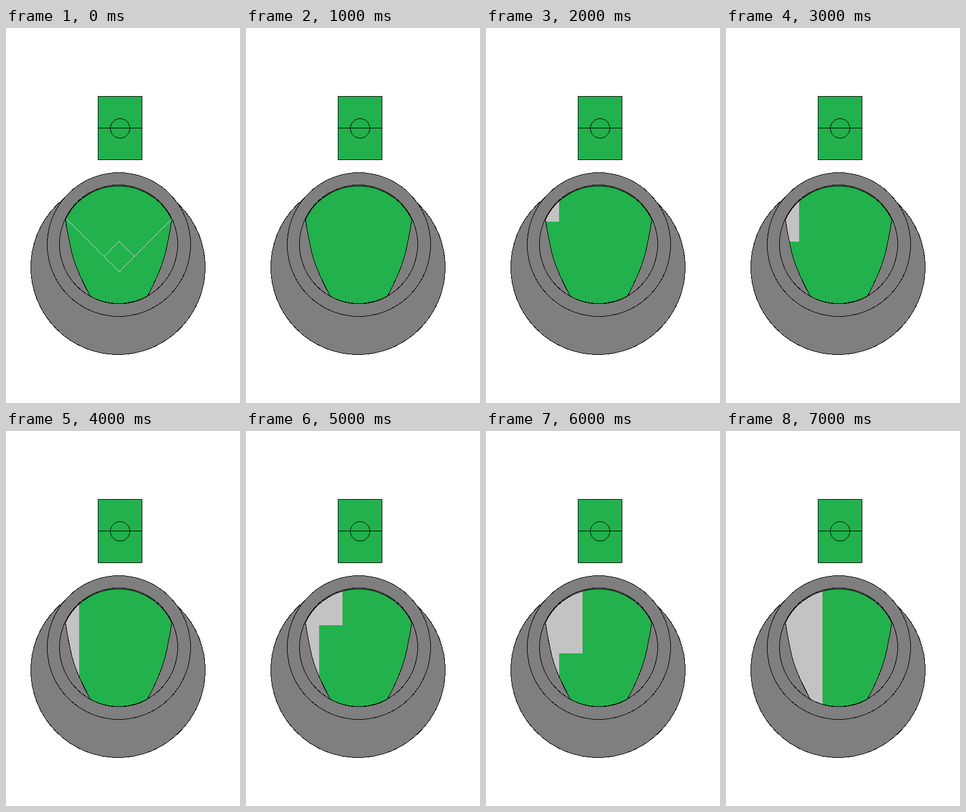
These frames come from a looping animation (400 by 639 pixels, 8000 ms). An HTML page:

```html
<!DOCTYPE html>
<html lang="en">
<head>
<meta charset="utf-8">
<title>Ballpark seating</title>
<style>
  html, body { margin: 0; width: 100%; height: 100%; overflow: hidden; background: #fff; }
  svg { display: block; width: 100vw; height: 100vh; }
  .line { fill: none; stroke: #000; }
  .chalk { fill: none; stroke: #dcd8d8; }
  .grass { fill: #22b14c; }
  .stand { fill: #7f7f7f; stroke: #000; }
</style>
</head>
<body>
<svg viewBox="0 0 400 639" shape-rendering="crispEdges">
  <defs>
    <path id="field" d="M101.5 326.5 A101 101 0 0 1 283.5 326.5
      C274 384 270 404 241.5 457.5 A101 101 0 0 1 144.5 457.5 C115 404 111 384 101.5 326.5Z"/>
    <clipPath id="inside"><use href="#field"/></clipPath>
  </defs>

  <rect class="grass" x="157.5" y="116.5" width="75" height="108" stroke="#000"/>
  <path class="line" d="M157 170.5H233"/>
  <circle class="line" cx="195" cy="171" r="16.5"/>

  <circle class="stand" cx="191.5" cy="407.5" r="149"/>
  <circle class="stand" cx="193" cy="369" r="122.5"/>
  <use class="grass" href="#field"/>
  <g id="seats" clip-path="url(#inside)" fill="#c3c3c3"></g>
  <use class="line" href="#field"/>
  <circle class="line" cx="192.5" cy="368.5" r="101"/>
  <path id="diamond" class="chalk"
    d="M103.5 325.5L193.5 415.5L283.5 325.5M167.5 389.5L193.5 363.5L219.5 389.5"/>
</svg>
<script>
  const STEP = 1000, LOOP = 8000;
  const seats = document.getElementById('seats');
  const diamond = document.getElementById('diamond');

  // Blocks in order of appearance: left, top, right, bottom
  const blocks = [
    [95, 260, 125, 330], [95, 330, 125, 364], [95, 364, 125, 470],
    [125, 260, 165, 331], [125, 331, 165, 379], [125, 379, 165, 475]
  ].map(([l, t, r, b]) => {
    const el = document.createElementNS('http://www.w3.org/2000/svg', 'rect');
    const box = { x: l, y: t, width: r - l, height: b - t };
    for (const key in box) el.setAttribute(key, box[key]);
    return seats.appendChild(el);
  });

  const show = (el, on) => el.setAttribute('visibility', on ? 'visible' : 'hidden');

  function draw(ms) {
    const step = Math.floor((ms % LOOP) / STEP);
    show(diamond, step === 0);
    blocks.forEach((el, i) => show(el, step >= i + 2));
  }

  const start = performance.now();
  function tick() {
    draw(performance.now() - start);
    requestAnimationFrame(tick);
  }
  tick();
</script>
</body>
</html>
```
